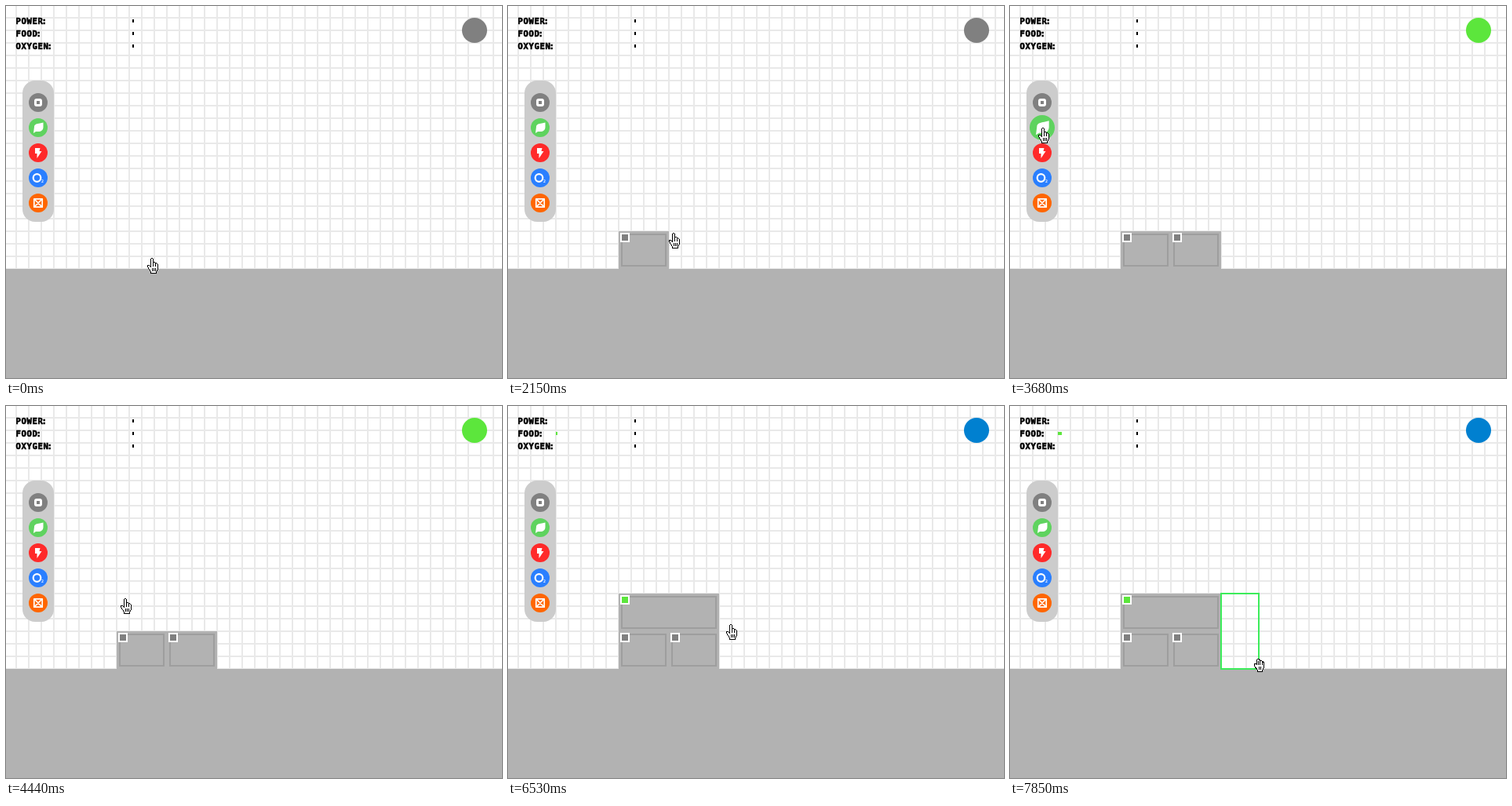
Animation, 632 px wide and 474 px high, one loop 8000 ms. Source, as an HTML page:

```html
<!DOCTYPE html>
<html lang="en">
<head>
<meta charset="utf-8">
<title>Base builder</title>
<style>
html, body { margin: 0; width: 100%; height: 100%; overflow: hidden; background: #fff; }
svg { display: block; width: 632px; height: 474px; }
text { font: bold 10.6px "DejaVu Sans Mono", monospace; letter-spacing: .6px; }
.label { stroke: #000; stroke-width: .6px; }
.crisp { shape-rendering: crispEdges; }
</style>
</head>
<body>
<svg viewBox="0 0 632 474">
  <defs>
    <pattern id="grid" x="12" y="14" width="16" height="16" patternUnits="userSpaceOnUse">
      <path d="M0 1H16M1 0V16" stroke="#e9e9e9" stroke-width="2"/>
    </pattern>
  </defs>
  <rect width="632" height="474" fill="#fff"/>
  <rect class="crisp" width="632" height="335" fill="url(#grid)"/>
  <rect y="335" width="632" height="139" fill="#b2b2b2"/>
  <g id="rooms" class="crisp"></g>
  <rect id="outline" class="crisp" fill="none" stroke="#3cec5a" stroke-width="2"/>

  <g id="meters"></g>
  <rect id="food" class="crisp" x="61" y="33" height="4" fill="#5ce63c"/>
  <circle id="tool" cx="597" cy="31" r="16"/>

  <rect x="21" y="95" width="40" height="180" rx="16" fill="#ccc"/>
  <g class="button">
    <circle r="12" fill="#808080"/>
    <rect x="-3.5" y="-3.5" width="7" height="7" rx="1.5" fill="none" stroke="#fff" stroke-width="3"/>
  </g>
  <g class="button">
    <circle r="12" fill="#5fd35f"/>
    <path d="M6.5-6.5V-1C6.5 3 4 5 0 5H-3L-6 7-5-1C-5-4-2-5 2-5.5Z" fill="#fff"/>
  </g>
  <g class="button">
    <circle r="12" fill="#ff2a2a"/>
    <path d="M-4-6H2.5L1.5-2H4.5L-1.5 7V1H-4Z" fill="#fff"/>
  </g>
  <g class="button">
    <circle r="12" fill="#2a7fff"/>
    <circle cx="-1.5" r="4.8" fill="none" stroke="#fff" stroke-width="2.2"/>
    <text x="4" y="5.5" fill="#fff" style="font-size:5px">2</text>
  </g>
  <g class="button">
    <circle r="12" fill="#ff6600"/>
    <path d="M-5.2-5.2H5.2V5.2H-5.2ZM-4 4L4-4M-4-4L4 4" fill="none" stroke="#fff" stroke-width="1.7" stroke-linejoin="round"/>
  </g>

  <g id="hand" class="crisp" fill="#fff" stroke="#000">
    <path id="open" d="M4.5 11.5V1.5L5.5.5H6.5L7.5 1.5V6.5L8.5 5.5H9.5L10.5 6.5H11.5L13.5 8.5V14.5L11.5 17.5V19.5H4.5V17.5L.5 11.5V9.5H2.5ZM7.5 6V10.5M10.5 7V10.5M6.5 13V17M8.5 13V17M10.5 13V17"/>
    <path id="closed" d="M3.5 10.5V4.5L4.5 3.5H6.5L7.5 5.5H9.5L10.5 6.5H11.5L12.5 8.5V14.5L10.5 17.5V19.5H4.5V17.5L.5 12.5V9.5H2.5ZM5.5 6V10.5M7.5 5V10.5M10.5 7V10.5M6.5 13V17M8.5 13V17"/>
  </g>
</svg>
<script>
const LOOP = 8000, CELL = 16, LEFT = 141, GROUND = 335;
const GREY = '#808080', GREEN = '#5ce63c', BLUE = '#0080d0';
const $ = id => document.getElementById(id);
const set = (el, attrs) => { for (const k in attrs) el.setAttribute(k, attrs[k]); };
const show = (el, on) => { el.style.display = on ? '' : 'none'; };
const clamp = v => Math.min(1, Math.max(0, v));
const ease = u => u * u * (3 - 2 * u);

// The hand rests between moves
const moves = [
  { from: 140, to: 920, x: 140, y: 287 },
  { from: 950, to: 1130, x: 197, y: 325 },
  { from: 1410, to: 1600, x: 216, y: 316 },
  { from: 1760, to: 2230, x: 204, y: 287 },
  { from: 2300, to: 2530, x: 262, y: 320 },
  { from: 2880, to: 3460, x: 35, y: 154 },
  { from: 3650, to: 4250, x: 146, y: 245 },
  { from: 4720, to: 5140, x: 263, y: 271 },
  { from: 5240, to: 5670, x: 70, y: 186 },
  { from: 5700, to: 5970, x: 35, y: 154 },
  { from: 6080, to: 6530, x: 278, y: 278 },
  { from: 6580, to: 6830, x: 328, y: 266 },
  { from: 6830, to: 7160, x: 269, y: 242 },
  { from: 7330, to: 7850, x: 311, y: 319 }
];

function handAt(t) {
  let x = 180, y = 321;
  for (const m of moves) {
    const u = ease(clamp((t - m.from) / (m.to - m.from)));
    x += (m.x - x) * u;
    y += (m.y - y) * u;
  }
  return [Math.round(x), Math.round(y)];
}

// Rooms in grid cells: column, height of the top edge above ground, width
const drags = [
  { from: 950, to: 1350, col: 0, top: 3, cols: 4, color: GREY },
  { from: 2300, to: 2820, col: 4, top: 3, cols: 4, color: GREY },
  { from: 4720, to: 5170, col: 0, top: 6, cols: 8, color: GREEN },
  { from: 7330, to: Infinity, col: 8, top: 6 }
];

const box = (x, y, w, h, style) =>
  `<rect x="${x}" y="${y}" width="${w}" height="${h}" ${style}/>`;

for (const d of drags) {
  const x = d.x = LEFT + d.col * CELL, y = d.y = GROUND - d.top * CELL;
  if (!d.cols) continue;
  const w = d.cols * CELL, h = 3 * CELL;
  d.room = document.createElementNS('http://www.w3.org/2000/svg', 'g');
  d.room.innerHTML = box(x, y, w, h, 'fill="#b2b2b2"')
    + box(x + 4, y + 4, w - 8, h - 8, 'fill="none" stroke="#9e9e9e" stroke-width="2"')
    + box(x + 2, y + 2, 12, 12, 'fill="#fff"')
    + box(x + 4, y + 4, 8, 8, `fill="${d.color}"`);
  $('rooms').append(d.room);
}

$('meters').innerHTML = ['POWER', 'FOOD', 'OXYGEN'].map((name, i) =>
  `<text class="label" x="12.5" y="${23 + 16 * i}">${name}<tspan dx="-2">:</tspan></text>`
  + box(161, 17 + 16 * i, 2, 4, 'class="crisp"')).join('');

const snap = length => CELL * Math.max(1, Math.ceil(length / CELL));
const buttons = document.querySelectorAll('.button');

function draw(t) {
  const [x, y] = handAt(t), tipX = x + 6, tipY = y + 1;
  set($('hand'), { transform: `translate(${x} ${y})` });

  const active = drags.find(d => t >= d.from && t < d.to);
  const gripping = drags.some(d => t >= d.from && t < d.to + 60);
  show($('open'), !gripping);
  show($('closed'), gripping);
  show($('outline'), active);
  if (active) set($('outline'), {
    x: active.x, y: active.y,
    width: snap(tipX - active.x), height: snap(tipY - active.y)
  });
  for (const d of drags) if (d.room) show(d.room, t >= d.to);

  buttons.forEach((b, i) => {
    const cy = 123 + 32 * i;
    const near = clamp((16 - Math.hypot(tipX - 41, tipY - cy)) / 6);
    set(b, { transform: `translate(41 ${cy}) scale(${1 + near / 3})` });
  });
  set($('tool'), { fill: t < 3640 ? GREY : t < 6080 ? GREEN : BLUE });
  set($('food'), { width: t < 6200 ? 0 : t < 7500 ? 2 : 5 });
}

function tick() {
  draw(performance.now() % LOOP);
  requestAnimationFrame(tick);
}
tick();
</script>
</body>
</html>
```
